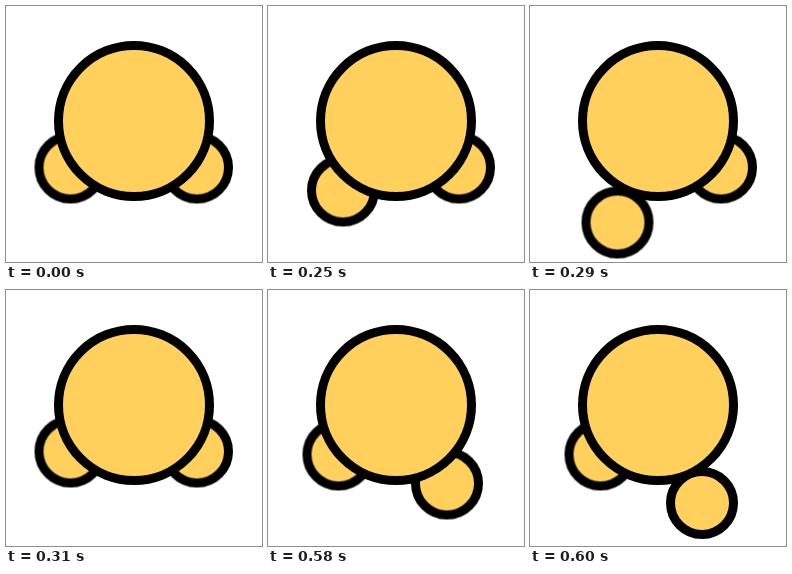
These frames come from a looping animation (256 px wide and 256 px high, 620 ms). An HTML page:

```html
<!DOCTYPE html>
<html lang="en">
<head>
<meta charset="utf-8">
<title>Punching paws</title>
<style>
  html, body { margin: 0; width: 100%; height: 100%; overflow: hidden; background: #fff; }
  svg { display: block; width: 100%; height: 100%; filter: blur(0.3px); }
  circle { fill: #ffd15c; stroke: #000; stroke-width: 9px; }
  .paw { animation: 620ms step-end infinite; }
  .left { animation-name: left-punch; }
  .right { animation-name: right-punch; }

  @keyframes left-punch {
    0%, 50% { transform: translate(64.5px, 161.5px); }
    40.32% { transform: translate(75px, 184.5px); }
    43.54% { transform: translate(81.5px, 200.5px); }
    46.77% { transform: translate(87.5px, 216.5px); }
    90.32%, 100% { transform: translate(70.5px, 164.5px); }
  }
  @keyframes right-punch {
    0% { transform: translate(191px, 161.5px); }
    90.32% { transform: translate(185.5px, 173.5px); }
    93.54% { transform: translate(179px, 193.5px); }
    96.77%, 100% { transform: translate(172px, 213px); }
  }
</style>
</head>
<body>
<svg viewBox="0 0 256 256">
  <circle class="paw left" r="31.5"/>
  <circle class="paw right" r="31.5"/>
  <circle cx="128" cy="115" r="75.5"/>
</svg>
</body>
</html>
```
